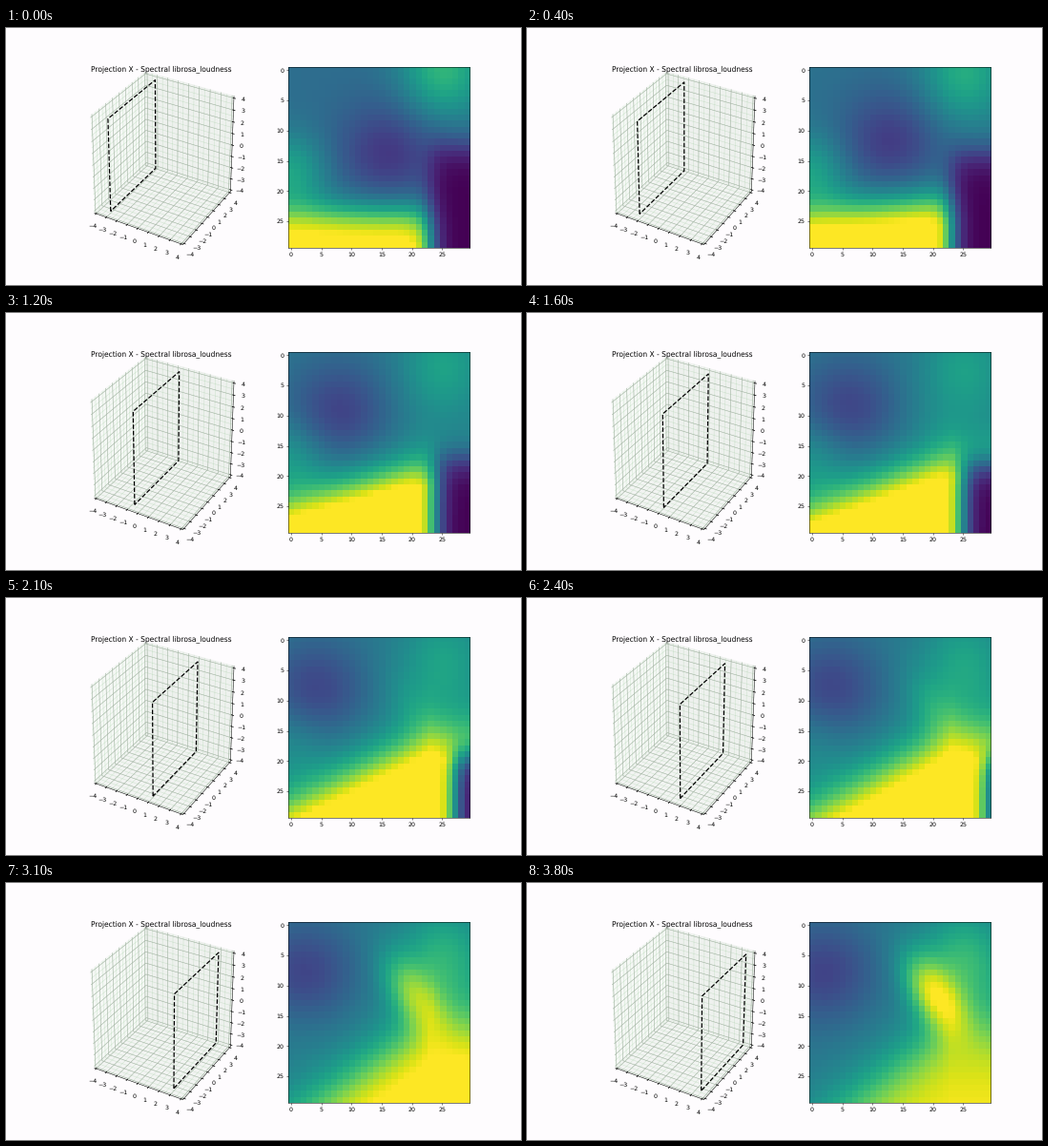
These frames come from a looping animation (540x270 px, 3900 ms). A matplotlib script:

```python
import numpy as np
import matplotlib.pyplot as plt
from matplotlib.animation import FuncAnimation
from matplotlib.patches import Polygon

plt.rcParams["font.family"] = "DejaVu Sans"
plt.rcParams["text.hinting"] = "none"

FRAMES, INTERVAL = 39, 100
LIM = 4
EDGE = LIM * (1 + 1 / 24)      # panes reach slightly past the axis limits
TICK = 2 * LIM / 12
PAD = 0.578                    # tick label distance in data units
X_START, X_STEP, X_END = -3, 0.1925, 3.55

# Camera at elevation 30, azimuth -60, distance 10
ELEV, AZIM = np.radians([30, -60])
TO_EYE = np.array([np.cos(AZIM) * np.cos(ELEV),
                   np.sin(AZIM) * np.cos(ELEV), np.sin(ELEV)])
RIGHT = np.array([-np.sin(AZIM), np.cos(AZIM), 0])
UP = np.cross(TO_EYE, RIGHT)

ROW, COL = np.mgrid[0:30, 0:30].astype(float)


def project(points):
    q = np.asarray(points, float) / (2 * LIM)
    depth = 10 - q @ TO_EYE
    return np.stack([q @ RIGHT / depth, q @ UP / depth], axis=-1)


def slice_x(frame):
    return min(X_START + X_STEP * frame, X_END)


def blob(row, col, tall, wide, angle=0):
    c, s = np.cos(angle), np.sin(angle)
    dr, dc = ROW - row, COL - col
    along, across = c * dr + s * dc, c * dc - s * dr
    return np.exp(-((along / tall) ** 2 + (across / wide) ** 2) / 2)


def rise(distance, width):
    return 1 / (1 + np.exp(-distance / width))


def slice_image(x):
    """Loudness in the slice: a few soft features that drift with x."""
    s = (x - X_START) / (X_END - X_START)
    back = 1 - s
    field = 0.36 + 0.14 * s - 0.1 * s**2
    field = field - 0.2 * blob(8 + 6 * back**3, 2 + 14 * back**2, 6, 6)
    field += 0.22 * back * blob(17, 0, 4.5, 4)
    field += (0.3 - 0.5 * s + 0.45 * s**2) * blob(6 * s, 25, 6, 5)
    field += 0.45 * s**4 * blob(11.5, 20, 5, 2.6, np.arctan2(5, 8))

    # Loud region filling the bottom, its front tilting as the slice moves
    front = 24 - 10 * s * back - 0.8 * s * (np.minimum(COL, 23) - 14)
    height = 0.75 + 1.1 * s - 1.25 * s**2
    field += height * rise(ROW - front, 1.8 + 2 * s)

    # Silent corner that leaves through the right edge
    silence = rise(COL - 22.8 - 17 * s**3, 1) * rise(ROW - 13 - 9 * s, 1.5)
    return np.clip(np.minimum(field, 1.1) * (1 - silence), 0, 1)


def slice_outline(x):
    y0, y1, z0, z1 = -3.5, 3.8, -4, 3.9
    return project([(x, y0, z0), (x, y0, z1), (x, y1, z1),
                    (x, y1, z0), (x, y0, z0)])


fig = plt.figure(figsize=(12, 6), dpi=45, facecolor="#fefcfe")
box = fig.add_subplot(1, 2, 1)
box.set_xlim(-0.095, 0.09)
box.set_ylim(-0.095, 0.09)
box.axis("off")
box.set_title("Projection X - Spectral librosa_loudness", fontsize=12, y=0.92)


def draw_line(points, **style):
    box.plot(*project(points).T, clip_on=False, **style)


# Back panes meet at one corner, where the grid lines bend
BACK = np.array([-EDGE, EDGE, -EDGE])


def draw_grid(values, **style):
    for axis in range(3):
        for value in values:
            bend = np.tile(BACK, (3, 1))
            bend[:, axis] = value
            bend[0, (axis + 1) % 3] *= -1
            bend[2, (axis + 2) % 3] *= -1
            draw_line(bend, **style)


for axis, grey in enumerate((0.95, 0.90, 0.925)):
    pane = np.tile(BACK, (4, 1))
    pane[1:3, (axis + 1) % 3] *= -1
    pane[2:, (axis + 2) % 3] *= -1
    box.add_patch(Polygon(project(pane), lw=0.8, alpha=0.5,
                          color=(grey - 0.02, grey + 0.01, grey - 0.02)))

draw_grid(np.arange(-LIM, LIM + 0.1, 0.5), color="green", alpha=0.14, lw=0.8)
draw_grid(range(-LIM, LIM + 1), color="#a6b2a6", lw=0.8)

# Axis edges: running axis, a corner on the edge, direction of the ticks
for axis, corner, tick_dir in ((0, (-1, -1, -1), 1),
                               (1, (1, 1, -1), 0),
                               (2, (1, 1, -1), 0)):
    corner = np.array(corner, float)
    ends = np.array([corner, corner]) * EDGE
    ends[:, axis] = -EDGE, EDGE
    draw_line(ends, color="black", lw=0.8, zorder=4)
    for value in range(-LIM, LIM + 1):
        base = corner * EDGE
        base[axis] = value
        tick = np.array([base, base])
        tick[:, tick_dir] += corner[tick_dir] * TICK * np.array([-0.1, 0.2])
        draw_line(tick, color="black", lw=1.2, zorder=4)
        spot = base + corner * PAD
        spot[axis] = value
        box.text(*project(spot), str(value).replace("-", "\u2212"),
                 fontsize=10, ha="center", va="top")

outline, = box.plot([], [], "--", color="black", lw=2, zorder=5)

panel = fig.add_subplot(1, 2, 2)
image = panel.imshow(slice_image(X_START), cmap="viridis", vmin=0, vmax=1,
                     interpolation="nearest")
panel.set_xticks(range(0, 30, 5))
panel.set_yticks(range(0, 30, 5))


def update(frame):
    x = slice_x(frame)
    outline.set_data(*slice_outline(x).T)
    image.set_data(slice_image(x))
    return outline, image


anim = FuncAnimation(fig, update, frames=FRAMES, interval=INTERVAL, repeat=True,
                     repeat_delay=0, blit=False)
plt.show()
```
